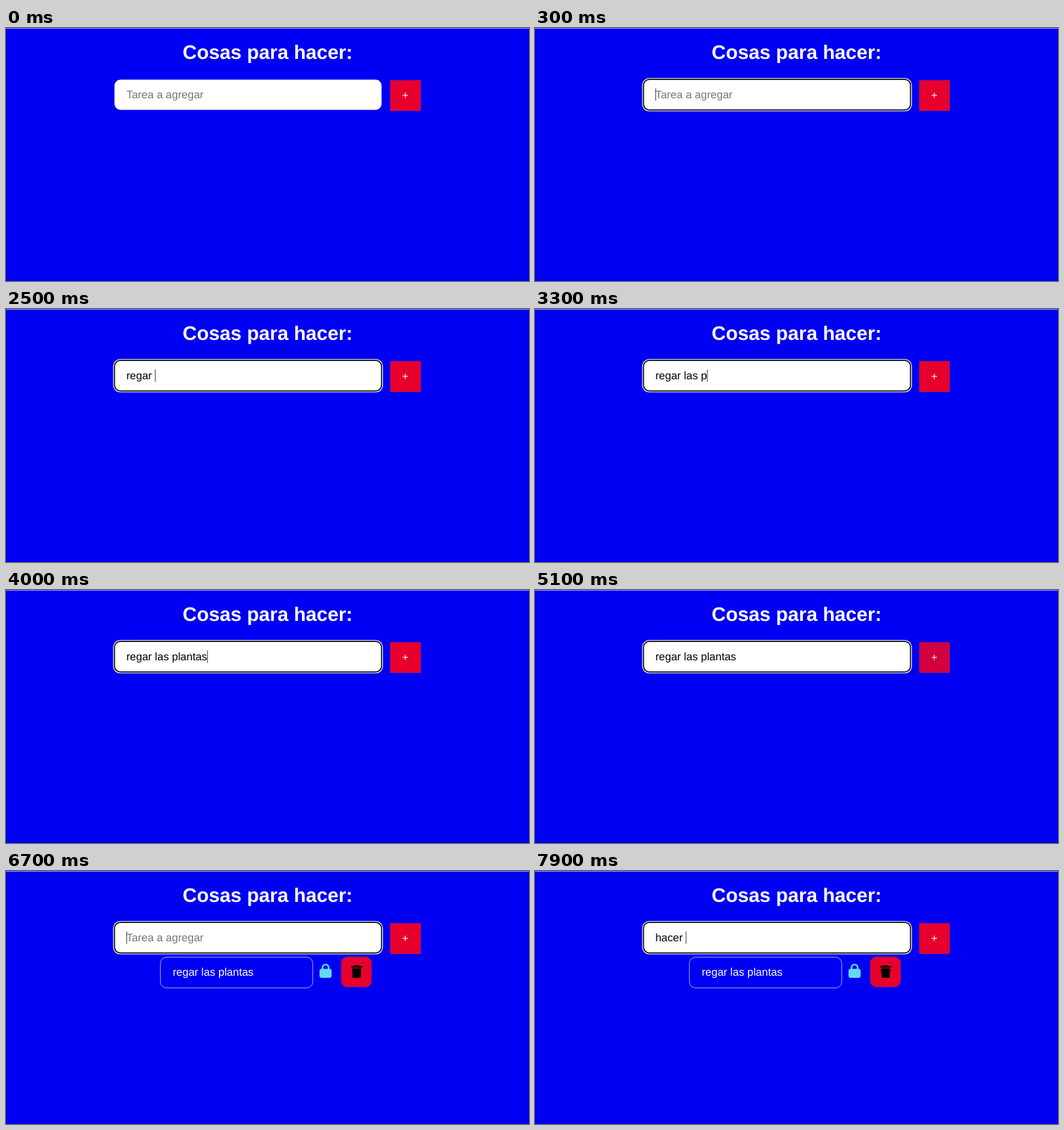
Animation, 744 px wide and 360 px high, one loop 8000 ms. Source, as an HTML page:

```html
<!DOCTYPE html>
<html lang="es">
<head>
<meta charset="utf-8">
<style>
  html, body { margin: 0; width: 100%; height: 100%; overflow: hidden; background: #0000f2; }
  svg { display: block; }
  text { font: 15.55px "Liberation Sans", Arial, sans-serif; fill: #fff; white-space: pre; text-rendering: geometricPrecision; }
  .title { font-size: 27.9px; font-weight: bold; }
  .mid { text-anchor: middle; }
  .red { fill: #e8002c; stroke: #d0103c; }
</style>
</head>
<body>
<svg width="744" height="360" viewBox="0 0 744 360">
  <rect width="744" height="1" fill="#9090ee"/>
  <text class="title mid" x="372.2" y="44.3">Cosas para hacer:</text>

  <rect x="154.3" y="73.4" width="380" height="43.2" rx="8.5" fill="#fffffd"/>
  <g id="ring">
    <rect x="152.4" y="71.2" width="383.8" height="47.4" rx="10" fill="#fff"/>
    <rect x="153.5" y="72.3" width="381.6" height="45.2" rx="9" fill="#101010"/>
    <rect x="155.2" y="74" width="378.2" height="41.8" rx="7.5" fill="#fffffd"/>
  </g>
  <text id="field" x="171.2" y="100"></text>
  <rect id="caret" y="86" width="1" height="17.5" fill="#444"/>

  <g id="add">
    <rect class="red" x="547" y="74.8" width="42.5" height="42.7"/>
    <text class="mid" x="568" y="101.4">+</text>
  </g>

  <g id="item">
    <rect x="219.7" y="122.7" width="216.6" height="43.6" rx="8.5" fill="none" stroke="#a4a4f8"/>
    <text x="237.2" y="149.4">regar las plantas</text>
    <rect x="446" y="139.3" width="17.2" height="12.6" rx="2.4" fill="#66d9f2"/>
    <path d="M450.3 140v-2.6a4.3 4.3 0 0 1 8.6 0v2.6" fill="none" stroke="#66d9f2" stroke-width="2.4"/>
    <rect class="red" x="477.2" y="122.5" width="42.6" height="42.3" rx="8.5"/>
    <path d="M491 135.2h4.2l.9-1.2h5.4l.9 1.2h4.2v2.2H491zM492.2 138.6h13.2l-.8 11.8q-.1 1.6-1.7 1.6h-8.2q-1.6 0-1.7-1.6z"/>
  </g>
</svg>
<script>
const LOOP = 8000, BLINK = 610, START_X = 171.2;

// One typing session: when focused and blurred, and when each letter lands
const sessions = [
  { from: 260, to: 5200, word: "regar las plantas",
    keys: [1600, 1700, 1800, 1900, 2000, 2500, 2700, 2800, 3000, 3100,
           3300, 3400, 3500, 3600, 3800, 3900, 4000] },
  { from: 6250, to: LOOP, word: "hacer ",
    keys: [7100, 7200, 7300, 7500, 7800, 7900] }
];

const [ring, field, caret, add, item] =
  ["ring", "field", "caret", "add", "item"].map(id => document.getElementById(id));
const show = (el, on) => el.setAttribute("visibility", on ? "visible" : "hidden");

function draw(t) {
  const active = sessions.find(s => t >= s.from && t < s.to);
  const count = active ? active.keys.filter(k => k <= t).length : 0;
  // The typed word stays for a moment until the new item is added
  const typed = active ? active.word.slice(0, count)
    : t >= 5200 && t < 5300 ? sessions[0].word : "";

  field.textContent = typed || "Tarea a agregar";
  field.style.fill = typed ? "#000" : "#757575";
  show(ring, active);

  const lastInput = active ? (count ? active.keys[count - 1] : active.from) : 0;
  show(caret, active && Math.floor((t - lastInput) / BLINK) % 2 === 0);
  caret.setAttribute("x", START_X + (typed ? field.getComputedTextLength() : 0));

  const hover = t < 5900 ? Math.min(Math.max((t - 4800) / 300, 0), 1) : 0;
  add.setAttribute("opacity", 1 - 0.1 * hover);
  show(item, t >= 5300);
}

const start = performance.now();
function frame() {
  const t = (performance.now() - start) % LOOP;
  draw(Math.floor(t / 100) * 100);
  requestAnimationFrame(frame);
}
frame();
</script>
</body>
</html>
```
